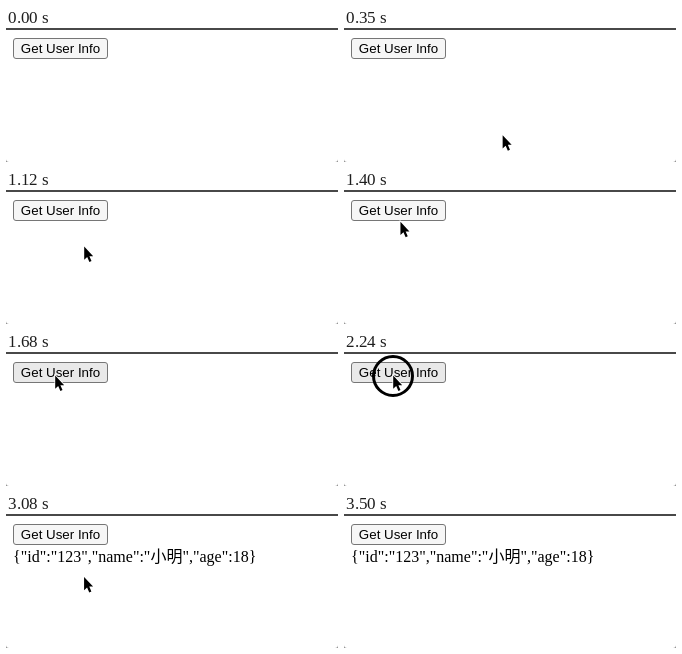
Recreate the animation shown at these times as an HTML page. Size 332 px wide and 134 px high, loop 3780 ms.

```html
<!DOCTYPE html>
<html lang="en">
<head>
<meta charset="utf-8">
<title>Get User Info</title>
<style>
  html, body { margin: 0; width: 100%; height: 100%; overflow: hidden; background: #8a8a8a; }
  #stage {
    position: relative; width: 332px; height: 134px; overflow: hidden;
    box-sizing: border-box; background: #fff;
    border-top: 2px solid #484848; border-radius: 0 0 3px 3px;
  }
  #button {
    position: absolute; left: 7px; top: 8px; width: 95px; height: 21px;
    box-sizing: border-box; border: 1px solid #767676; border-radius: 3px;
    background: #f6f6f6; color: #000; text-align: center; white-space: nowrap;
    font: 13.333px/19px "Liberation Sans", Arial, sans-serif;
  }
  #button.hover { background: #e9e9e9; }
  #result {
    position: absolute; left: 7px; top: 32px; color: #000; white-space: nowrap;
    font: 300 16px/18px "Liberation Serif", "Noto Sans CJK SC", "Noto Sans CJK", serif;
  }
  svg { position: absolute; left: 0; top: -2px; }
</style>
</head>
<body>
<div id="stage">
  <div id="button">Get User Info</div>
  <div id="result">{"id":"123","name":"小明","age":18}</div>
  <svg width="332" height="134" viewBox="0 0 332 134">
    <circle id="ring" cx="49" cy="24" r="19.5" fill="none" stroke="#000" stroke-width="3"/>
    <path id="cursor" d="M1.2 1.5V14.8L4.2 12L6.4 17L8.5 16.1L6.4 11.2H10.2Z"
      fill="#000" stroke="#fff" stroke-width="1.5" paint-order="stroke"/>
  </svg>
</div>
<script>
  const LOOP = 3780, TICK = 70;
  const [button, result, ring, cursor] =
    ["button", "result", "ring", "cursor"].map(id => document.getElementById(id));

  const enter = 70, click = 2240, answer = 2450, leave = 3500;
  const entry = { x: 321, y: 119 };

  // Each leg slows down into its end point and rests there until the next one
  const legs = [
    { start: enter, end: 490, x: 137, y: 104 },
    { start: 770, end: 910, x: 84, y: 68 },
    { start: 1050, end: 1120, x: 77, y: 55 },
    { start: 1120, end: 1680, x: 48, y: 22 },
    { start: 3010, end: 3290, x: 114, y: 112 },
    { start: 3360, end: 3430, x: 125, y: 124 }
  ];

  const easeOut = k => 1 - (1 - k) ** 2;
  const show = (el, on) => { el.style.visibility = on ? "visible" : "hidden"; };

  function pointerAt(t) {
    let { x, y } = entry;
    for (const leg of legs) {
      const k = easeOut(Math.min(1, Math.max(0, (t - leg.start) / (leg.end - leg.start))));
      x += (leg.x - x) * k;
      y += (leg.y - y) * k;
    }
    return { x, y };
  }

  function draw(time) {
    const t = Math.floor(time % LOOP / TICK) * TICK;
    const { x, y } = pointerAt(t);
    const present = t >= enter && t < leave;
    cursor.setAttribute("transform", `translate(${x} ${y})`);
    button.className = present && x < 102 && y < 30 ? "hover" : "";
    show(cursor, present);
    show(ring, t >= click && t < answer);
    show(result, t >= answer);
  }

  let start;
  function frame(now) {
    start ??= now;
    draw(now - start);
    requestAnimationFrame(frame);
  }
  draw(0);
  requestAnimationFrame(frame);
</script>
</body>
</html>
```
